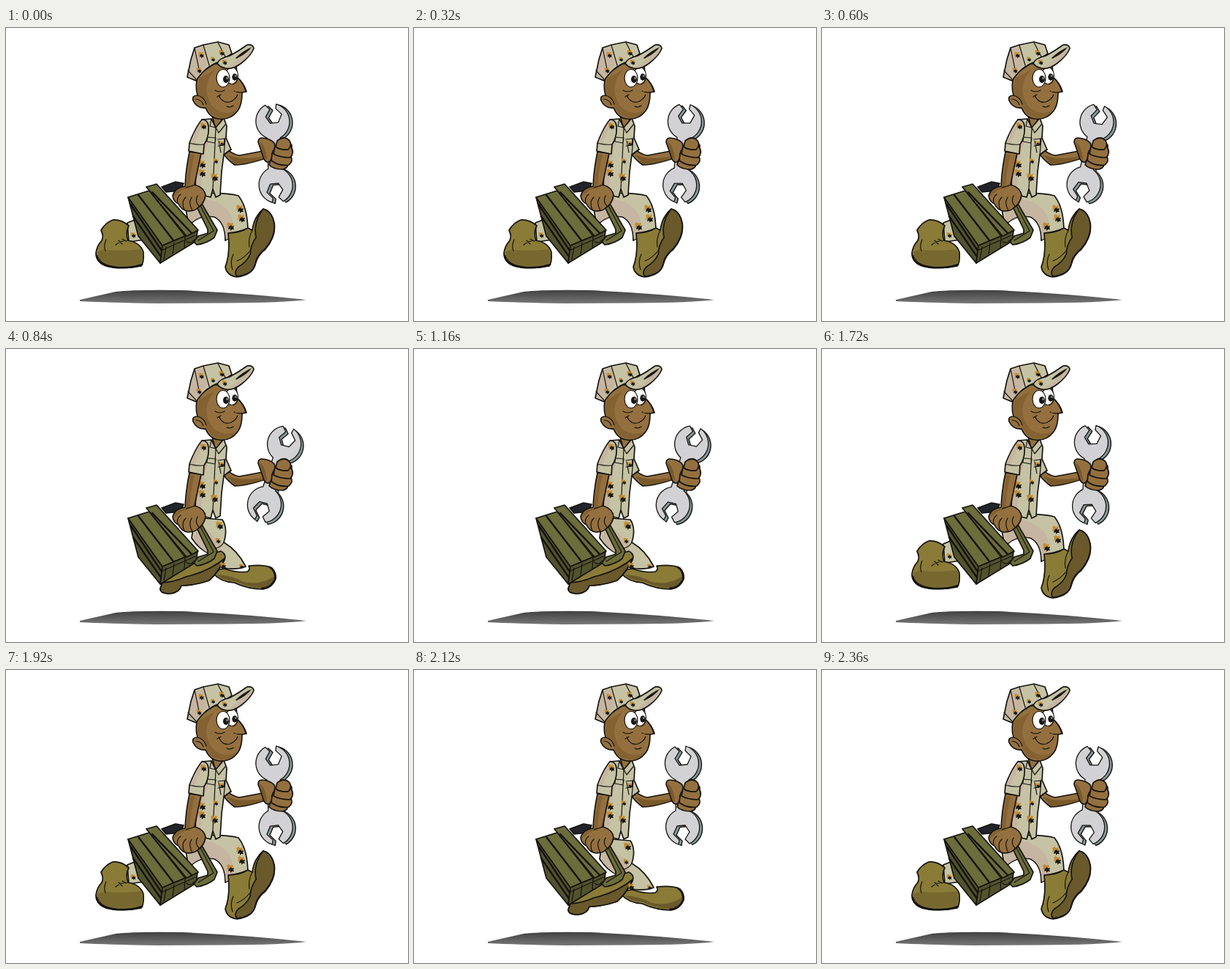
An HTML page that plays this animation: 550x400 px, repeating every 2400 ms.

```html
<!DOCTYPE html>
<html lang="en">
<head>
<meta charset="utf-8">
<title>Running mechanic</title>
<style>
html, body { margin: 0; width: 100%; height: 100%; overflow: hidden; background: #fff; }
svg { display: block; width: 550px; height: 400px; }
.o { stroke: #15130f; stroke-width: 1.7; stroke-linejoin: round; stroke-linecap: round; }
.l { fill: none; stroke: #15130f; stroke-width: 1.2; stroke-linejoin: round; stroke-linecap: round; }
.cloth { fill: #c5c3a4; }
.tan { fill: #c6b5a0; }
.skin { fill: #94703f; }
.dim { fill: #795829; }
.boot { fill: #8a7b37; }
.sole { fill: #69592b; }
.box { fill: #6b6d3b; }
.deep { fill: #51532c; }
</style>
</head>
<body>
<svg viewBox="0 0 550 400" xmlns="http://www.w3.org/2000/svg">
<defs>
  <linearGradient id="ground" x1="0" y1="0" x2="0" y2="1">
    <stop offset="0" stop-color="#414141"/><stop offset="1" stop-color="#777"/>
  </linearGradient>
  <g id="spot">
    <path fill="#c18c31" d="M-5-3l3-2 2 2 4-1-1 3 2 2-4 1-1 3-2-3-3 1 1-3z"/>
    <path fill="#191816" d="M-2 1l3-2 1 2 3-1-1 3 1 2-3 0-2 2 0-3-3 1z"/>
  </g>
  <path id="steel" d="M-9-21A25 25 0 0 1-10-66L-4-60-10-50-4-41 7-42 12-53 4-61 5-67A25 25 0 0 1 9-21L9 21A25 25 0 0 1 10 66L4 60 10 50 4 41-7 42-12 53-4 61-5 67A25 25 0 0 1-9 21Z"/>
</defs>

<path fill="url(#ground)" d="M101 371L150 360Q175 357 240 358Q330 362 411 371Q380 375 300 375.500L205 376Q140 375 101 373Z"/>

<g id="stride">
  <path class="cloth o" d="M166 266L176 262 190 289 168 292Z"/>
  <path class="boot o" d="M146 262Q158 261 168 270Q163 279 167 290Q184 293 188 306Q189 320 185 325Q160 330 137 325Q123 320 123 307Q124 298 131 290Q134 284 130 276Q136 266 146 262Z"/>
  <path class="sole" d="M125 306Q134 301 136 303Q155 305 185 302Q189 314 184 322Q155 328 137 322Q125 317 125 306Z" opacity=".55"/>
  <path class="l" d="M136 304Q133 298 137 289M167 290Q157 290 150 296M154 290L159 295M159 288L164 291"/>
  <path class="l" stroke-width="2.600" style="stroke-width:2.8" d="M124 311Q128 325 152 327Q172 328 186 323"/>
  <path class="cloth o" d="M259 226Q300 224 318 229Q330 244 331 274L300 290Q300 265 285 258Q264 254 250 270L246 247Z"/>
  <path class="tan" d="M262 233Q289 232 305 251Q313 266 311 284L301 289Q300 264 285 257Q265 254 252 267L250 247Z"/>
  <path class="boot o" d="M304 280Q318 279 331 273L337 276Q339 258 352 247Q363 249 367 266Q370 284 355 302Q344 310 341 323Q337 337 316 340Q302 338 300 326Q307 308 304 280Z"/>
  <path class="sole o" d="M352 247Q364 250 367 267Q369 284 355 301Q343 310 341 322Q338 337 316 339Q311 334 318 326Q329 320 334 309Q335 295 342 286Q338 264 352 247Z"/>
  <path class="l" d="M304 280Q321 280 331 273M337 276Q331 287 333 299M311 309Q306 319 310 330M316 318Q326 314 333 305"/>
  <use href="#spot" x="320" y="246"/><use href="#spot" x="322" y="259"/>
  <use href="#spot" x="307" y="270"/><use href="#spot" transform="translate(174 282) scale(.7)"/>
</g>

<g id="pass" visibility="hidden">
  <path class="boot o" d="M284 307Q288 300 299 300Q317 306 330 304Q335 301 332 296Q355 294 364 299Q370 305 369 314Q364 326 352 328Q332 328 312 319Q294 318 284 307Z"/>
  <path class="sole" d="M288 308Q310 309 325 318Q347 323 366 311Q366 322 352 326Q333 326 313 317Q297 316 288 308Z"/>
  <path class="l" style="stroke-width:2.4" d="M361 298Q369 303 368 314Q364 326 350 327"/>
  <path class="cloth o" d="M258 230L296 233Q304 245 298 264Q317 275 328 297Q316 302 296 299L279 280Q263 273 254 258Z"/>
  <path class="tan" d="M260 247Q280 246 292 265Q297 277 295 296L279 280Q264 272 257 259Z"/>
  <path class="l" d="M298 264Q294 271 284 273"/>
  <path class="boot o" d="M214 319Q237 305 252 290Q276 281 294 276Q302 280 299 288Q291 304 278 316Q258 323 240 323Q237 333 224 334Q211 334 211 327Z"/>
  <path class="sole o" d="M214 319Q231 318 246 311Q277 304 299 286Q291 304 278 316Q258 323 240 323Q237 333 224 334Q211 334 211 327Z"/>
  <use href="#spot" x="292" y="240"/><use href="#spot" transform="translate(290 261) scale(.7)"/>
  <use href="#spot" transform="translate(297 295) scale(.8)"/><use href="#spot" transform="translate(322 296) scale(.6)"/>
</g>

<path class="skin o" d="M299 162Q308 172 319 174L351 168 363 164 368 178 352 179Q327 187 313 187Q304 181 296 170Z"/>
<path class="dim" d="M302 172Q315 181 352 176L351 179Q327 186 313 186Z"/>
<path class="skin o" d="M364 158L381 149 391 160 389 181 374 192 359 187Z"/>
<g id="wrench">
  <g class="o" fill="#87999a" style="stroke-width:1.4">
    <use href="#steel" x="4" y="1.500"/>
  </g>
  <use href="#steel" x="2" y=".7" fill="#87999a"/>
  <use href="#steel" class="o" fill="#d2d2d4" style="stroke-width:1.3"/>
</g>
<path class="skin o" d="M350 150Q362 151 367 157Q370 163 365 168L363 181Q357 186 353 179Q349 167 345 156Q345 150 350 150Z"/>
<path class="dim" d="M347 155Q355 160 357 180Q353 178 352 173Z"/>
<g class="skin o">
  <path d="M362 180Q371 179 384 184Q388 190 379 193Q366 193 360 187Z"/>
  <path d="M364 171Q375 169 389 174Q394 181 387 187Q374 189 363 181Z"/>
  <path d="M368 161Q379 158 390 162Q395 170 389 177Q375 177 366 172Z"/>
  <path d="M371 154Q381 146 388 154Q392 160 386 166Q375 167 369 162Z"/>
</g>

<g id="torso">
  <path class="skin o" d="M280 112L287 139 299 119Z"/>
  <path class="cloth o" d="M281 124L287 136 298 123 302 134 301 150 308 166 298 173 295 196 293 228 287 231 283 220 280 231 261 226Q257 211 263 181L271 158 268 125Z"/>
  <path class="tan" d="M269 128L276 126 276 158Q267 183 267 226L261 224Q259 204 264 181L271 159Z"/>
  <path class="l" d="M281 124L279 134 287 136 291 143 300 132M287 136Q285 177 283 220M275 149L287 150 286 157 275 155ZM290 152L299 151 298 160 290 161M298 173L300 150M298 173L307 166M291 154L294 170"/>
  <use href="#spot" x="268" y="185"/><use href="#spot" x="268" y="197"/>
  <use href="#spot" x="285" y="203"/><use href="#spot" transform="translate(287 181) scale(.65)"/>
  <use href="#spot" transform="translate(295 157) scale(.6)"/>
</g>

<g id="head">
  <path class="skin o" d="M263 63Q258 79 262 92Q254 92 256 99Q261 110 273 109Q279 123 291 124Q307 126 317 113Q323 105 323 88L329 87Q326 76 316 67L315 48 285 49Z"/>
  <path class="dim" d="M264 69Q260 83 264 92L271 98 275 109Q282 121 292 122Q306 124 315 113Q299 120 286 110Q276 101 274 85Q274 71 286 57Z" opacity=".55"/>
  <path class="l" d="M262 92Q271 94 274 104M260 97Q268 98 270 105M312 86Q319 89 328 87M291 92Q296 103 306 101Q314 98 317 91M289 94L294 91M302 107Q307 109 311 106M286 85Q292 89 299 85"/>
  <ellipse class="o" cx="309" cy="65" rx="8.500" ry="11.500" fill="#fff" style="stroke-width:1.2"/>
  <ellipse class="o" cx="297" cy="68.500" rx="9" ry="12" fill="#fff" style="stroke-width:1.2"/>
  <ellipse cx="301" cy="70" rx="4" ry="5" fill="#161616"/><ellipse cx="313" cy="67" rx="3.700" ry="4.700" fill="#161616"/>
  <ellipse cx="302.500" cy="68.500" rx="1.500" ry="2" fill="#77746e"/><ellipse cx="314" cy="65.500" rx="1.300" ry="1.800" fill="#77746e"/>
  <g id="lids" visibility="hidden">
    <ellipse class="skin o" cx="309" cy="65" rx="8.500" ry="11.500" style="stroke-width:1.2"/>
    <ellipse class="skin o" cx="297" cy="68.500" rx="9" ry="12" style="stroke-width:1.2"/>
    <path class="l" d="M289 73Q297 78 305 72Q312 73 317 67"/>
  </g>
  <path class="skin" d="M308 77Q314 73 318 70Q325 77 328 86L314 87Z"/>
  <path class="l" d="M310 77Q316 76 317 68Q325 75 328 87"/>
  <path class="cloth o" d="M260 72L248 67 253 43 258 27 270 23 290 19 305 23 309 35 292 46Q273 52 260 72Z"/>
  <path class="tan" d="M259 29L270 25 275 50Q267 58 260 70L250 65 254 44Z"/>
  <path class="l" d="M258 27L265 61M270 23L278 51M290 20L300 39M249 58L260 70"/>
  <use href="#spot" transform="translate(264 57) scale(.7)"/><use href="#spot" transform="translate(267 36) scale(.75)"/>
  <use href="#spot" transform="translate(295 33) scale(.75)"/><use href="#spot" transform="translate(283 42) scale(.6)"/>
  <path class="cloth o" d="M289 48Q292 41 306 38Q319 31 330 23Q338 22 339 28Q335 38 322 48Q310 57 301 55Q293 54 289 48Z"/>
  <path class="tan" d="M303 53Q314 49 323 38L337 27Q334 38 321 47Q312 54 303 53Z"/>
  <path fill="#181715" d="M314 41Q323 32 336 26Q331 34 315 42Z"/>
  <use href="#spot" transform="translate(299 46) scale(.7)"/>
</g>

<g id="kit">
  <path class="o" fill="#22242a" d="M213 217L232 210 243 212 239 222 219 224Z"/>
  <path class="deep o" d="M167 231L214 297 211 321 181 284Z"/>
  <path class="box o" d="M167 231L196 222 245 284 214 297Z"/>
  <path class="deep o" d="M214 297L262 277 260 291 211 321Z"/>
  <path class="box o" d="M192 217L206 213 263 276 247 284Z"/>
  <path class="l" style="stroke-width:2.4" d="M181 228L229 290M170 240L213 304M174 257L212 312M200 224L254 280"/>
  <path class="l" d="M219 299L216 316M230 293L228 309M214 303L259 283M245 285L244 300M247 291Q252 296 258 289"/>
  <path class="box o" d="M258 238L264 233 289 276 285 286Q275 294 261 296L257 292 263 284 276 280 276 275Z"/>
  <path class="l" d="M264 239L284 277 263 290"/>
</g>

<g id="arm">
  <path class="skin o" d="M251 169Q246 193 245 216Q231 218 228 229Q229 237 236 240Q240 249 249 250Q258 250 262 246Q271 240 273 229Q272 218 258 214Q262 194 267 171Z"/>
  <path class="dim" d="M252 172L258 173Q252 195 251 219Q239 219 230 231Q230 220 246 217Z" opacity=".6"/>
  <path class="l" d="M235 239Q233 231 239 227M244 248Q239 238 246 231M255 249Q249 239 254 231M264 243Q258 237 262 229M246 218Q254 216 258 214"/>
  <path class="cloth o" d="M268 125Q276 125 277 134Q278 149 271 159L270 172 250 168 251 157Q259 136 268 125Z"/>
  <path class="tan" d="M268 127L272 128Q264 141 258 158L252 157Q259 138 268 127Z"/>
  <path class="l" d="M251 157Q261 160 271 159"/>
  <use href="#spot" transform="translate(270 133) scale(.85)"/>
</g>
</svg>
<script>
const LOOP = 2400, STEP = 40;
const [stride, pass, wrench, lids] =
  ['stride', 'pass', 'wrench', 'lids'].map(id => document.getElementById(id));

// time in ms, tilt in degrees
const tilt = [[0, -2], [320, 5.2], [840, 19], [980, 22], [1160, 17.7], [1720, 2.6],
  [1920, -2], [2000, -2], [2120, 0], [2360, 5.2], [2400, 6]];

function tween(keys, t) {
  const i = keys.findIndex(k => k[0] > t);
  const [t0, a] = keys[i - 1], [t1, b] = keys[i];
  return a + (b - a) * (t - t0) / (t1 - t0);
}

const show = (el, on) => el.setAttribute('visibility', on ? 'visible' : 'hidden');

function draw(ms) {
  const n = Math.floor((ms % LOOP) / STEP), t = n * STEP;
  const wide = (n + 1) % 4 < 2;
  show(stride, wide);
  show(pass, !wide);
  show(lids, t % 1200 >= 960 && t % 1200 < 1040);
  wrench.setAttribute('transform', `translate(367 171) rotate(${tween(tilt, t)})`);
}

const start = performance.now();
function tick() {
  draw(Math.max(0, performance.now() - start));
  requestAnimationFrame(tick);
}
draw(0);
requestAnimationFrame(tick);
</script>
</body>
</html>
```
